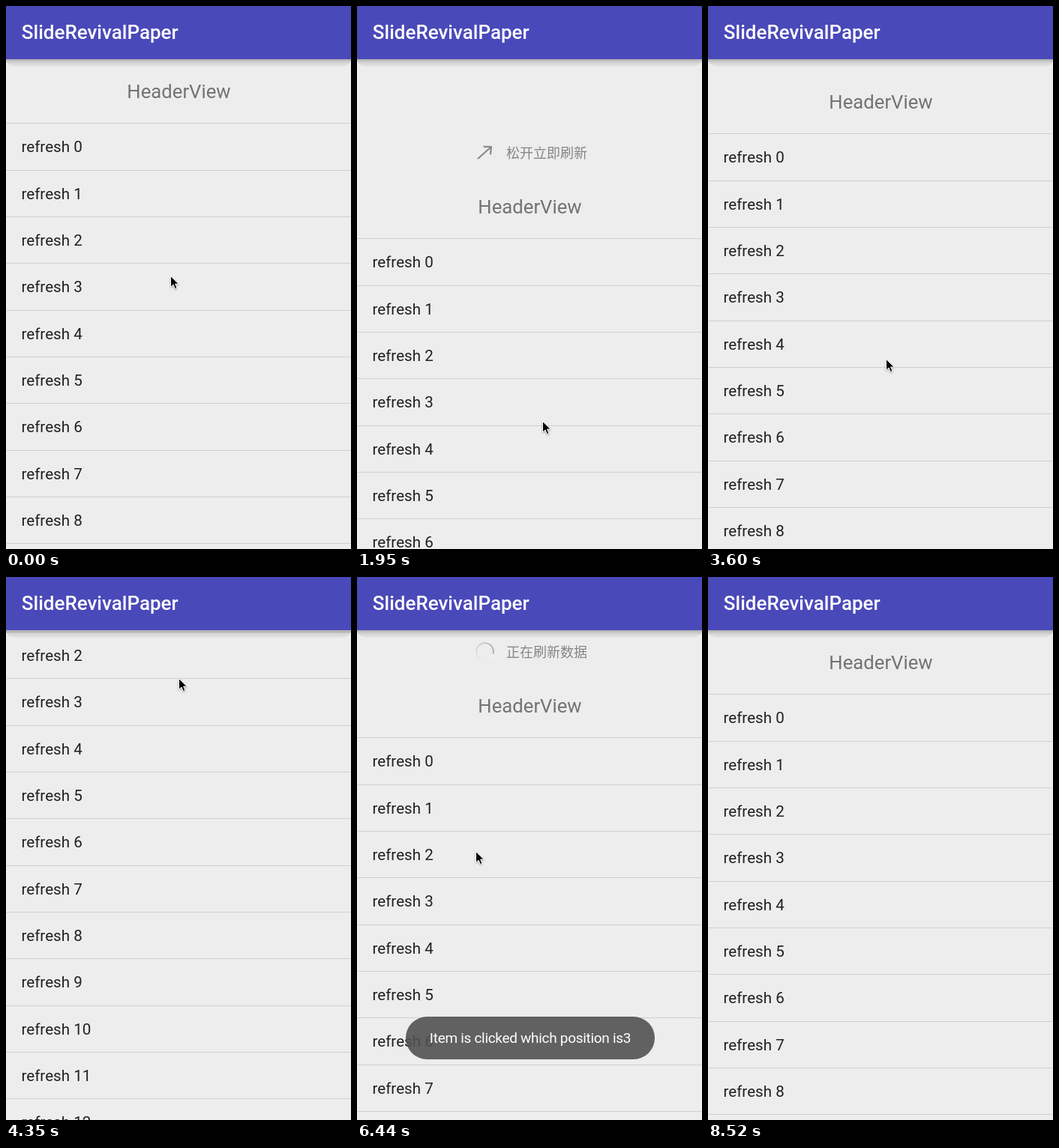
These frames come from a looping animation (460 by 725 pixels, 9.06 s). An HTML page:

```html
<!DOCTYPE html>
<html lang="en">
<head>
<meta charset="utf-8">
<title>Pull to refresh</title>
<style>
html, body { margin: 0; width: 100%; height: 100%; overflow: hidden; background: #ededed; }
#stage { position: relative; width: 460px; height: 725px; overflow: hidden; background: #ededed;
  font: 20.6px Roboto, sans-serif; color: #202020; white-space: nowrap; }
#stage div, #stage svg { position: absolute; }
#list { left: 0; top: 0; width: 460px; }
.row { left: 0; width: 439px; height: 62px; padding-left: 20.5px; line-height: 63px; border-top: 1px solid #cfcfcf; }
#head { top: 72px; width: 461px; line-height: 85px; text-align: center; font-size: 25.7px; color: #737373; }
#pull { top: 13px; width: 460px; height: 58px; }
#label { left: 199px; font: 18px/56px "Noto Sans CJK SC", "Noto Sans CJK", sans-serif; color: #858585; }
#arrow { left: 156px; top: 15px; }
#spin { left: 158px; top: 16px; width: 25px; height: 25px; border-radius: 50%;
  background: conic-gradient(#f8f8f8, #e2e2e2 40%, #a9a9a9);
  -webkit-mask: radial-gradient(circle, transparent 10px, #000 10.7px);
  mask: radial-gradient(circle, transparent 10px, #000 10.7px); }
#shade { top: 71px; width: 460px; height: 10px; border-radius: 0 0 14px 14px / 0 0 9px 9px;
  background: linear-gradient(rgba(0,0,0,.26), rgba(0,0,0,.11) 45%, rgba(0,0,0,.03)); }
#bar { top: 0; width: 439.2px; height: 71px; padding-left: 20.8px; background: #4a49b9;
  color: #fff; font-size: 26px; font-weight: 500; line-height: 71px; }
#toast { left: 65px; top: 587px; width: 332px; height: 57px; border-radius: 29px; background: rgba(80,80,80,.89);
  color: #fff; font-size: 19px; letter-spacing: -.3px; line-height: 57px; text-align: center; }
#cursor { left: 0; top: 0; overflow: visible; filter: drop-shadow(0 1px 1px rgba(0,0,0,.35)); }
</style>
</head>
<body>
<div id="stage">
  <div id="list">
    <div id="pull">
      <svg id="arrow" width="28" height="28" viewBox="-14 -14 28 28" fill="none" stroke="#8a8a8a" stroke-width="2.2">
        <path d="M0 12V-12M-7 -4.5L0 -12L7 -4.5"/>
      </svg>
      <div id="spin"></div>
      <div id="label"></div>
    </div>
    <div id="head">HeaderView</div>
  </div>
  <div id="shade"></div>
  <div id="bar">SlideRevivalPaper</div>
  <div id="toast">Item is clicked which position is3</div>
  <svg id="cursor" width="13" height="19">
    <path d="M.5 .5V15.2L4 12L6.4 17.6L9 16.5L6.6 11.1H11.3Z" fill="#000" stroke="#fff"/>
  </svg>
</div>
<script>
const LOOP = 9060, LAST = 8520, FRAME = 150;
const PULL = 160, HOLD = 58, SCROLL = 266;
const $ = id => document.getElementById(id);
const [list, arrow, spin, label, toast, cursor] =
  ['list', 'arrow', 'spin', 'label', 'toast', 'cursor'].map($);

for (let i = 0; i < 15; i++) {
  const row = document.createElement('div');
  row.className = 'row';
  row.textContent = 'refresh ' + i;
  row.style.top = Math.floor(156.7 + 62.35 * i) + 'px';
  list.append(row);
}

// Progress from 0 to 1 between two times; a higher power slows the end
const ramp = (t, from, to, power = 1) =>
  1 - (1 - Math.min(1, Math.max(0, (t - from) / (to - from)))) ** power;

// Pull down, snap to the spinner, scroll up, flick back, close
const offset = t => PULL * ramp(t, 750, 2250, 2)
  - (PULL - HOLD) * ramp(t, 2400, 2700, 2)
  - SCROLL * ramp(t, 3450, 4350)
  + SCROLL * ramp(t, 4350, 4650, 6)
  - HOLD * ramp(t, 7180, 7320);

// Pointer moves: from, to, x, y
const moves = [
  [0, 600, 204, 273],
  [750, 1950, 247, 554],
  [2400, 2700, 238, 538],
  [3450, 4350, 230, 135],
  [4350, 5700, 158, 366],
  [7330, 8480, 411, 745]
];
const pointer = t => moves.reduce(([x, y], [from, to, nx, ny]) => {
  const p = ramp(t, from, to);
  return [x + (nx - x) * p, y + (ny - y) * p];
}, [219, 360]);

function draw(t) {
  const busy = t >= 2500 && t < 7000;
  const [x, y] = pointer(t).map(Math.round);
  list.style.transform = `translateY(${Math.round(offset(t))}px)`;
  label.textContent = t < 1900 ? '下拉可以刷新' : t < 2500 ? '松开立即刷新' : busy ? '正在刷新数据' : '刷新完成';
  arrow.style.display = t < 2500 ? '' : 'none';
  arrow.style.transform = `rotate(${180 - 180 * ramp(t, 1800, 2005)}deg)`;
  spin.style.display = busy ? '' : 'none';
  spin.style.transform = `rotate(${(t - 2700) / 535 * 360 + 110}deg)`;
  toast.style.opacity = ramp(t, 6150, 6430) - ramp(t, 8080, 8380);
  cursor.style.transform = `translate(${x}px, ${y}px)`;
}

// The picture advances in even steps and rests at the end; the late steps run slightly short
function step(t) {
  const split = 6440;
  if (t < split) return Math.floor(t / FRAME) * FRAME;
  const size = (LAST - split) / 14;
  return Math.min(LAST, split + Math.floor((t - split) / size) * size);
}

const start = performance.now();
function tick() {
  draw(step((performance.now() - start) % LOOP));
  requestAnimationFrame(tick);
}
tick();
</script>
</body>
</html>
```
